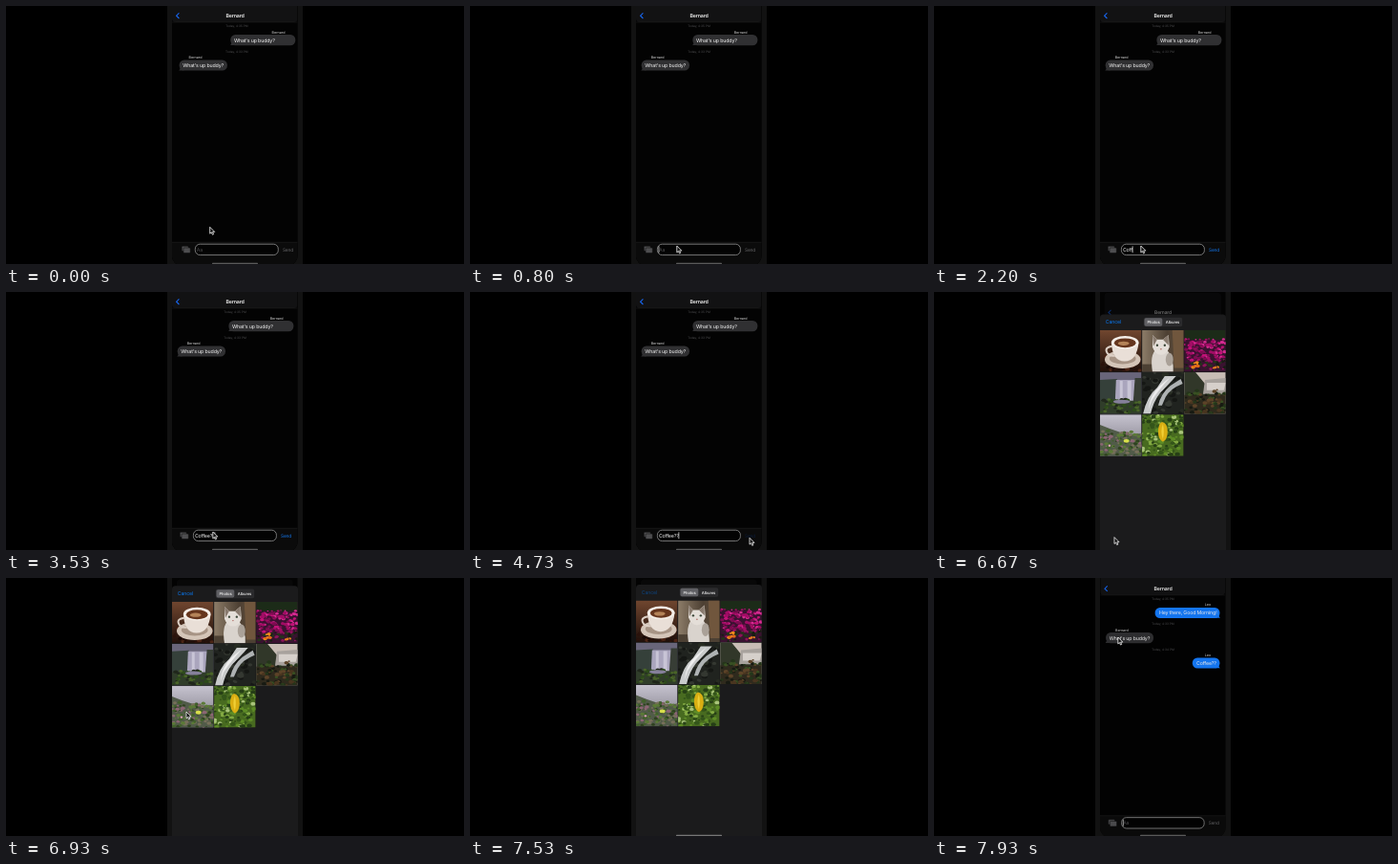
An HTML page for the animation above (8 s loop, 480 by 270 pixels).

```html
<!DOCTYPE html>
<html lang="en">
<head>
<meta charset="utf-8">
<title>Chat</title>
<style>
  html, body { margin: 0; height: 100%; overflow: hidden; background: #000; }
  svg { display: block; }
  #stage { width: 100vw; height: 100vh; }
  text { font: 5.3px Inter, "Open Sans", sans-serif; letter-spacing: -.03em; fill: #f4f4f4; text-rendering: geometricPrecision; white-space: pre; }
  .title { font-size: 5.3px; font-weight: 600; text-anchor: middle; }
  .date { font-size: 3.2px; letter-spacing: 0; fill: #4c4c4e; text-anchor: middle; }
  .name { font-size: 3.7px; letter-spacing: 0; fill: #d8d8d8; }
  .seg { font-size: 4.2px; font-weight: 500; text-anchor: middle; }
  #send { font-size: 4.8px; }
</style>
</head>
<body>
<svg id="stage" viewBox="0 0 480 270">
  <defs>
    <clipPath id="screen"><rect x="174" y="-20" width="131.5" height="291" rx="9"/></clipPath>
    <linearGradient id="sky" x2="0" y2="1"><stop stop-color="#c6c3cf"/><stop offset="1" stop-color="#77747f"/></linearGradient>
    <linearGradient id="wood" x2="0" y2="1"><stop stop-color="#70462f"/><stop offset="1" stop-color="#1f0f0a"/></linearGradient>
    <linearGradient id="wall"><stop stop-color="#8c7c68"/><stop offset=".6" stop-color="#4d4033"/><stop offset="1" stop-color="#65503b"/></linearGradient>
  </defs>
  <rect width="480" height="270"/>
  <rect x="169" width="142" height="270" fill="#121212"/>
  <g clip-path="url(#screen)">
    <rect x="174" width="132" height="272" fill="#030303"/>
    <g id="page">
      <rect x="174" y="-12" width="131.5" height="290" rx="4" fill="#030303"/>
      <rect x="174" y="-12" width="131.5" height="29" rx="4" fill="#121213"/>
      <path d="M174 17h131.5" stroke="#222" stroke-width=".5"/>
      <path d="M181.4 7.4l-2.8 2.8 2.8 2.8" fill="none" stroke="#1767f2" stroke-width="1.1"/>
      <text class="title" x="240" y="12.1">Bernard</text>
      <g id="body">
        <g id="messages"></g>
        <g id="footer">
          <rect x="172" y="247" width="136" height="30" fill="#0b0b0b"/>
          <path d="M172 247.3h136" stroke="#1d1d1d" stroke-width=".6"/>
          <g id="album" fill="#4e4e50" stroke="#0b0b0b" stroke-width=".5">
            <rect x="182.3" y="251.3" width="7" height="5.3" rx="1"/>
            <rect x="184" y="253" width="7.3" height="5.5" rx="1"/>
          </g>
          <rect x="196.4" y="249.2" width="87" height="11.4" rx="5" fill="#030303" stroke="#929292" stroke-width=".8"/>
          <text id="input" x="197.9" y="256.7"></text>
          <rect id="caret" y="251.3" width=".7" height="7" fill="#eee"/>
          <text id="send" x="288" y="256.8">Send</text>
        </g>
      </g>
    </g>
    <rect x="216" y="268.8" width="48" height="1.2" rx=".6" fill="#5a5a5a"/>
  </g>
  <g id="picker">
    <rect x="174" width="132" height="290" rx="3.5" fill="#1b1b1c"/>
    <text id="cancel" x="179.7" y="9.7" fill="#0a78f0">Cancel</text>
    <rect x="219.8" y="3.2" width="40.4" height="9.6" rx="2" fill="#2b2b2d"/>
    <rect x="220.5" y="3.8" width="18.8" height="8.4" rx="1.7" fill="#606064"/>
    <text class="seg" x="230" y="9.5">Photos</text>
    <text class="seg" x="250" y="9.5">Albums</text>
    <g id="photos"></g>
    <rect x="216" y="261.8" width="48" height="1.2" rx=".6" fill="#777"/>
  </g>
  <path id="cursor" d="M0 0V6.9L1.6 5.5 2.7 8 3.9 7.5 2.8 5.1H5Z" fill="#111" stroke="#f5f5f5" stroke-width=".8"/>
</svg>
<script>
const LOOP = 8000, FPS = 15;
const $ = id => document.getElementById(id);
const clamp = v => Math.max(0, Math.min(1, v));

// Critically damped spring: 1 at the start, settling to 0.
const spring = (seconds, rate) => {
  const x = Math.max(0, seconds) * rate;
  return (1 + x) * Math.exp(-x);
};

function randomizer(seed) {
  return () => (seed = (seed * 16807) % 2147483647) / 2147483647;
}

function scatter(seed, count, [x, y, w, h], size, colors) {
  const rnd = randomizer(seed * 7919);
  return Array.from({ length: count }, () => {
    const cx = x + rnd() * w, cy = y + rnd() * h, r = size * (.5 + rnd());
    const fill = colors[Math.floor(rnd() * colors.length)];
    return `<ellipse cx="${cx}" cy="${cy}" rx="${r}" ry="${r * .75}" fill="${fill}"/>`;
  }).join("");
}

const fillRect = (fill, y = 0, h = 44) => `<rect y="${y}" width="44" height="${h}" fill="${fill}"/>`;
const shape = (d, fill) => `<path d="${d}" fill="${fill}"/>`;
const oval = (cx, cy, rx, ry, fill) => `<ellipse cx="${cx}" cy="${cy}" rx="${rx}" ry="${ry}" fill="${fill}"/>`;

const photos = [
  // coffee
  fillRect("url(#wood)") + scatter(1, 45, [0, 22, 44, 22], 1.8, ["#2b120b", "#4b2415", "#1a0a06"]) +
    oval(24, 31, 19, 9.5, "#d4c5b8") + oval(24, 30, 14, 6, "#a79485") +
    shape("M12 13q1 20 14 20t15-20z", "#e9dfd7") + oval(26.5, 13, 14.5, 7, "#f5efe9") +
    oval(26.5, 13.5, 11.5, 5, "#65351d") + oval(25, 14, 6, 2.2, "#b48358") +
    `<path d="M13 17q-8 1-6 6t9 4" fill="none" stroke="#ddd0c6" stroke-width="2"/>`,
  // cat
  fillRect("url(#wall)") + fillRect("#4c4033", 36, 8) + shape("M32 0h12v40H34z", "#70563d") +
    shape("M11 44q-3-18 4-24h11q8 10 7 24z", "#d9d3cd") + shape("M11 5l5 5h6l6-5 1 13q-3 8-9 8t-9-8z", "#e4ded8") +
    shape("M11 5l5 5-4 7zM28 5l-6 5 6 6z", "#887a6e") + oval(16, 16, 1.2, 1.2, "#3b4638") +
    oval(24, 16, 1.2, 1.2, "#3b4638") + oval(20, 20, 1, .7, "#b77f78") + oval(29, 31, 4, 7, "#aaa198"),
  // magenta flowers
  fillRect("#3a1230") + fillRect("#1c2b18", 0, 10) + scatter(3, 130, [0, 8, 44, 25], 1.6, ["#c31278", "#a20c65", "#d52a90", "#7d0c51"]) +
    scatter(4, 50, [0, 32, 44, 12], 1.5, ["#24351b", "#171e12", "#8c1459"]) +
    scatter(5, 9, [9, 33, 6, 7], 1.7, ["#ef8a1c", "#e06a15"]) + scatter(6, 5, [31, 36, 5, 4], 1.2, ["#e17a20"]),
  // wide waterfall
  fillRect("#69657a") + shape("M0 8l18-1v24H0z", "#35403a") + shape("M17 8h22l-3 23H16z", "#aaa5bd") +
    shape("M21 9h3v22h-3zM29 9h4v22h-4z", "#c8c4d6") + shape("M37 6h7v28h-9z", "#373d35") +
    fillRect("#303d2a", 30, 14) + scatter(7, 60, [0, 28, 44, 16], 1.8, ["#2d4a1b", "#4a6528", "#20271b"]) + oval(23, 31, 9, 2, "#85809a"),
  // cascade
  fillRect("#20231f") + scatter(8, 55, [0, 0, 44, 44], 2.5, ["#151714", "#343831", "#272c22"]) +
    shape("M24 4h12Q26 15 19 22 12 31 9 44H1Q5 25 16 16z", "#c9cbcb") +
    shape("M41 7l2 5Q30 17 25 26l-4 9h-4Q20 22 30 14z", "#aeb2b3") + shape("M30 5Q18 18 10 30l-3 9Q8 24 19 14z", "#eee"),
  // canyon at dusk
  fillRect("#c8bdb5") + shape("M0 0h12l10 12 22 7v25H0z", "#313729") + shape("M22 8l22-2v17H20z", "#a8a29d") +
    shape("M24 11h20l-2 8H24z", "#d6d0cb") + fillRect("#2f2a1d", 24, 20) +
    scatter(9, 90, [0, 18, 44, 26], 1.9, ["#24351a", "#49351f", "#171a12", "#5c4328", "#385022"]),
  // meadow
  fillRect("url(#sky)") + shape("M0 11q12 5 22 8t22 1v24H0z", "#515b49") +
    scatter(10, 120, [0, 17, 44, 27], 1.6, ["#41612a", "#5b7a37", "#2f421f", "#77705a", "#8c6574"]) +
    oval(28, 28, 3, 2, "#d8df4b") + oval(10, 33, 1.2, 1.2, "#dda2b6"),
  // foliage
  fillRect("#486b20") + scatter(11, 150, [0, 0, 44, 44], 1.9, ["#5e8c26", "#34551a", "#83aa42", "#263f16", "#a9c47a"]) +
    shape("M21 8q6 1 6 10t-5 11q-5-3-5-11t4-10z", "#d9ae12") + shape("M22 10q2 8 0 16-3-8 0-16z", "#f0cf35")
];

$("photos").innerHTML = photos.map((art, i) =>
  `<svg x="${174 + i % 3 * 44.1}" y="${16.5 + Math.floor(i / 3) * 44.1}" width="43.5" height="43.5" viewBox="0 0 44 44">${art}</svg>`
).join("");

const date = (y, time) => `<text class="date" x="240" y="${y}">Today, ${time} PM</text>`;

function bubble({ x, y, w, text, name, nameX, mine }) {
  const fill = mine ? "#167bfb" : "#303032";
  const tail = mine
    ? `M${x + w - 5} ${y + 11}h5.4q-1.6-1-1.6-4z`
    : `M${x + 5} ${y + 11}h-5.4q1.6-1 1.6-4z`;
  return `<text class="name" x="${nameX}" y="${y - 1.5}">${name}</text>
    <rect x="${x}" y="${y}" width="${w}" height="11.2" rx="5.2" fill="${fill}"/>
    ${shape(tail, fill)}<text x="${x + (mine ? 4.3 : 3.6)}" y="${y + 7.6}">${text}</text>`;
}

const greeting = "What's up buddy?";
const reply = date(48.6, "4:33") + bubble({ x: 179.7, y: 56.4, w: 50.3, text: greeting, name: "Bernard", nameX: 189.7 });
const before = date(22.2, "4:35") +
  bubble({ x: 233.4, y: 30.1, w: 68, text: greeting, name: "Bernard", nameX: 276.7 }) + reply;
const after = date(22.2, "4:35") +
  bubble({ x: 231.6, y: 30.1, w: 68.2, text: "Hey there, Good Morning!", name: "Leo", nameX: 284, mine: true }) + reply +
  date(75, "4:34") + bubble({ x: 271, y: 82.9, w: 28.8, text: "Coffee??", name: "Leo", nameX: 284, mine: true });

const SENT = 4860;
const typing = [[1330, "C"], [1800, "Co"], [2000, "Cof"], [2130, "Coff"], [2530, "Coffee".slice(0, 5)], [3000, "Coffee"], [3530, "Coffee??"], [SENT, ""]];
const cursorPath = [
  [0, 213.7, 231.3], [200, 216.8, 237], [335, 216.8, 237], [533, 216.8, 251], [3934, 216.8, 251], [4533, 293, 257.3],
  [5134, 293, 257.3], [5933, 189, 256.6], [6734, 189, 256.6], [6933, 189, 140], [7300, 180, 12.5], [7700, 180, 12.5], [7933, 192.8, 62]
];

function cursorAt(t) {
  const next = cursorPath.findIndex(p => p[0] > t);
  if (next < 0) return cursorPath.at(-1).slice(1);
  const [t0, x0, y0] = cursorPath[next - 1], [t1, x1, y1] = cursorPath[next];
  const u = (t - t0) / (t1 - t0), k = u * u * (3 - 2 * u);
  return [x0 + (x1 - x0) * k, y0 + (y1 - y0) * k];
}

let shown;
function draw(t) {
  const sent = t >= SENT;
  if (shown !== sent) $("messages").innerHTML = (shown = sent) ? after : before;

  const typed = typing.filter(([start]) => t >= start).at(-1)?.[1] ?? "";
  $("input").textContent = typed || "Aa";
  $("input").style.fill = typed ? "#f4f4f4" : "#4a4a4c";
  $("caret").setAttribute("x", 197.6 + (typed ? $("input").getComputedTextLength() : 0));
  $("caret").style.opacity = t >= 795 ? 1 : 0;
  $("send").style.fill = !typed ? "#68686a" : t >= 4720 ? "#0b1d3b" : "#1479f2";
  $("album").style.opacity = t >= 6125 && t < 6400 ? .4 : 1;

  const closing = t >= 7700;
  const open = closing ? spring((t - 7700) / 1000, 18) : 1 - spring((t - 6260) / 1000, 11);
  const drop = closing ? 290 * (1 - open) : 264 * (1 - open);
  $("picker").setAttribute("transform", `translate(0 ${7 + drop})`);
  $("picker").style.display = open > 0 && drop < 263 ? "" : "none";
  $("cancel").style.fill = t >= 7390 ? "#0d447f" : "#0a78f0";

  const scale = 1 - .075 * open;
  $("page").setAttribute("transform", `translate(${240 * (1 - scale)} ${12.7 * open}) scale(${scale})`);
  $("page").style.opacity = 1 - .6 * open;
  $("body").setAttribute("transform", `translate(${1.9 * (1 - clamp(t / 200))} 0)`);
  $("footer").setAttribute("transform", `translate(0 ${25 * open})`);

  $("cursor").setAttribute("transform", `translate(${cursorAt(t)})`);
  $("cursor").style.display = t >= 7500 && t < 7700 ? "none" : "";
}

const start = performance.now();
function tick() {
  const t = (performance.now() - start) % LOOP;
  draw(Math.floor(t * FPS / 1000 + .06) * 1000 / FPS);
  requestAnimationFrame(tick);
}
tick();
</script>
</body>
</html>
```
